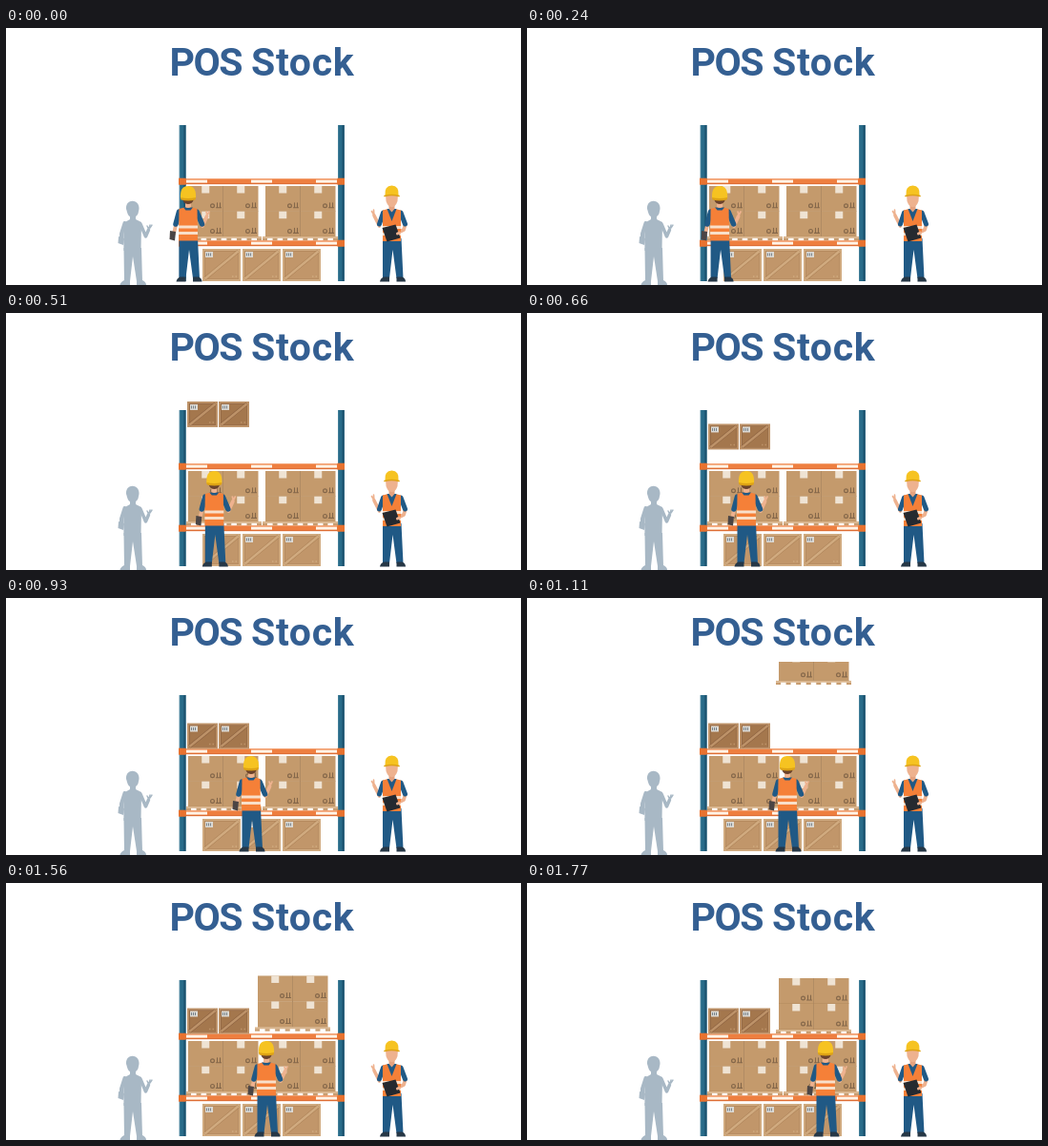
Recreate the animation shown at these times as an HTML page. Size 540 by 270 pixels, loop 1.8 s.

```html
<!DOCTYPE html>
<html lang="en">
<head>
<meta charset="utf-8">
<title>POS Stock</title>
<style>
html, body { margin: 0; width: 100%; height: 100%; overflow: hidden; background: #fff; }
svg { display: block; width: 540px; height: 270px; }
.title { font: 700 41px Roboto, Inter, sans-serif; fill: #345f92; }
</style>
</head>
<body>
<svg viewBox="0 0 540 270">
  <defs>
    <clipPath id="below"><rect x="0" y="67" width="540" height="203"/></clipPath>
  </defs>
  <text class="title" y="49.5"><tspan x="171.500" letter-spacing="-1.500">POS</tspan> <tspan x="257" letter-spacing=".7">Stock</tspan></text>
  <g id="rack"></g>
  <g clip-path="url(#below)">
    <g id="crates"></g>
    <g id="load"></g>
  </g>
  <g id="shade" fill="#a8b8c5" stroke="#a8b8c5" stroke-linecap="round" stroke-linejoin="round">
    <path d="M126 190C125 179 140 179 139.500 190L138.500 195Q136.500 199 133 199Q129 199 127.500 195Z" stroke="none"/>
    <path d="M130 196H136V201L142 204L141.500 234H123.500L123 205L130 201Z" stroke="none"/>
    <path d="M124.500 205L121 216L121 224" fill="none" stroke-width="4"/>
    <path d="M141 206L146.500 219L149.500 212" fill="none" stroke-width="3.500"/>
    <path d="M149.500 212L151 207M149.500 211L148 208M151 210L153 207" fill="none" stroke-width="1.400"/>
    <path d="M118 219L124 221L123 228L117.500 226Z" stroke="none"/>
    <path d="M123.500 231H142L143 266H137L133 240L130 266H124Z" stroke="none"/>
    <path d="M119.500 270Q120 267 124 265H130V270ZM137 270V265H143Q147 267 147 270Z" stroke="none"/>
  </g>
  <g id="clerk"></g>
  <g id="worker"></g>
</svg>
<script>
const LOOP = 1800, STEP = 30;
const el = id => document.getElementById(id);
const rect = (x, y, w, h, fill) =>
  `<rect x="${x}" y="${y}" width="${w}" height="${h}" fill="${fill}"/>`;
const shape = (d, fill) => `<path d="${d}" fill="${fill}"/>`;
const line = (d, color, width, cap = 'round') =>
  `<path d="${d}" fill="none" stroke="${color}" stroke-width="${width}" stroke-linecap="${cap}" stroke-linejoin="round"/>`;

const navy = '#205985', dark = '#263746', skin = '#eeb28f', orange = '#f58038',
      stripe = '#f9dfc9', yellow = '#f6c321', amber = '#dea315';

function carton(x, y, w, h) {
  const mx = x + w - 12, my = y + h - 7, ink = '#84674a';
  return rect(x, y, w, h, '#c49a6c') +
    rect(x, y + h - 0.6, w, 0.6, '#b58c5f') +
    rect(x + w / 2 - 4, y, 8, 7.5, '#efe3d3') +
    `<circle cx="${mx + 1}" cy="${my + 1}" r="1.900" fill="none" stroke="${ink}" stroke-width="1.200"/>` +
    line(`M${mx + 6} ${my + 3}v-5M${mx + 9} ${my + 3}v-5M${mx + 5} ${my + 3}h5`, ink, 1.1);
}

function stack(x, y, rowH) {
  let s = '';
  for (const r of [0, 1]) for (const c of [0, 1])
    s += carton(x + c * 37, y + r * rowH, 36.5, rowH);
  return s + rect(x + 36.2, y, 0.8, rowH * 2, '#a67c50');
}

function pallet(x, y, w) {
  let s = rect(x, y, w, 1.8, '#d9b48b');
  for (let i = 0; i < 8; i++) s += rect(x + i * (w - 5) / 7, y + 1.8, 5, 2.4, '#c89d70');
  return s;
}

function crate(x, y, w, h, wood, shadow, light) {
  const slat = `M${x + 2.5} ${y + h - 2.5}L${x + w - 2.5} ${y + 2.5}`;
  return rect(x, y, w, h, light) +
    rect(x + 2, y + 2, w - 4, h - 4, shadow) +
    rect(x + 2.6, y + 2.6, w - 5, h - 5, wood) +
    line(slat, shadow, 3.6, 'butt') + line(slat, light, 2.6, 'butt') +
    rect(x + 3, y + 3, 8, 6, '#dcdad5') +
    line(`M${x + 4.5} ${y + 4.5}v3m2 -3v3m2 -3v3`, '#78838b', 1, 'butt') +
    line(`M${x + w - 9} ${y + h - 5}h1.5m2 0h1.5`, light, 1.5, 'butt');
}

function beam(y) {
  return rect(182, y, 172, 5.8, '#ee7f40') + rect(182, y + 4.8, 172, 1, '#dc6c33') +
    rect(181, y - 0.6, 7.5, 7, '#e8722f') + rect(347.5, y - 0.6, 7.5, 7, '#e8722f') +
    [[189, 22], [257, 22], [325, 22]].map(([x, w]) => rect(x, y + 1.3, w, 3, '#fff4e8')).join('');
}

const post = x => rect(x, 102, 6.7, 164, '#286b89') + rect(x + 4.5, 102, 2.2, 164, '#1b526f') +
  rect(x, 102, 1, 164, '#427f99');

el('rack').innerHTML =
  [206, 248, 290].map(x => crate(x, 232, 40, 34, '#c1966a', '#ad8257', '#d0aa7f')).join('') +
  stack(191, 166, 26.7) + stack(272, 166, 26.7) +
  pallet(189, 219, 79) + pallet(269, 219, 79) +
  post(181.8) + post(348) + beam(158.3) + beam(223.3);

el('crates').innerHTML =
  [190, 223].map(x => crate(x, 131.5, 32, 27, '#a4774d', '#8b6140', '#bd9268')).join('');

el('load').innerHTML = stack(264, 100, 27) + pallet(261, 154, 79);

const legs = shape('M-9.500 221H10L12 263H5L1 233L-2.500 263H-9.500Z', navy);
const shoes = shape('M-12.500 266.500Q-12 263 -8.500 261.500H-2.500V266.500ZM5 266.500V261.500H11Q14.500 263 14.500 266.500Z', dark);

// Seen from behind, x = 0 at the head
el('worker').innerHTML =
  legs + shoes +
  line('M-13 207L-15 216', skin, 3.8) +
  line('M15 208L19.500 198', skin, 3.8) + line('M20 197L19 193M20 197L22 193', skin, 1.7) +
  line('M-9.500 193L-13 206', navy, 5.5) +
  line('M9 193L14.500 206', navy, 5.5) +
  shape('M-19 213L-13 214L-14 223.500L-19.500 222Z', '#4b4545') +
  shape('M-9.500 190Q0 186.500 9.500 190L10 223.500H-10Z', orange) +
  shape('M-5 188.500H5L2.500 191.500H-2.500Z', navy) +
  rect(-10, 207.5, 20, 3, stripe) + rect(-10, 214, 20, 3, stripe) +
  shape('M-3 181H3V188Q0 190 -3 188Z', skin) +
  shape('M-6.500 176H6.500L5.500 181Q4 185 0 185Q-4 185 -5.500 181Z', '#6b422b') +
  shape('M-8 179Q-9 166 0 166Q9 166 8 179Q0 182 -8 179Z', yellow) +
  shape('M-8 178Q0 180 8 178L7.500 180.500Q0 182.500 -7.500 180.500Z', amber);

// Seen from the front
el('clerk').innerHTML = `<g transform="translate(404.500 0)">` +
  legs + shoes +
  line('M-13 208L-18.500 197', skin, 3.6) + line('M-18.500 197L-21 192.500M-18.500 197L-19 191', skin, 1.6) +
  line('M-9 194L-13 206', navy, 5) +
  line('M14 207L12.500 212L6 215', skin, 3.8) +
  line('M9.500 194L14 206', navy, 5) +
  shape('M-9.500 191.500Q0 188 9.500 191.500L9.500 224H-9.500Z', orange) +
  shape('M-5 190H5L0 203Z', navy) +
  rect(-9.5, 208, 19, 3, stripe) + rect(-9.5, 215, 19, 3, stripe) +
  shape('M-3 184H3V190L0 193.500L-3 190Z', '#e5a27e') +
  shape('M-6.500 175H6.500L6 182Q4 188 0 188Q-4 188 -6 182Z', skin) +
  shape('M-7 176Q-8 165.500 0 165.500Q8 165.500 7 176Z', yellow) +
  line('M-7.500 176.500Q0 174.500 7.500 176.500', amber, 1.6) +
  shape('M-10 210L4 206.500L9 220.500L-5 224.500Z', '#252a30') +
  line('M6 216L8 215', skin, 3) + `</g>`;

// [time, x] of the worker
const walk = [[0, 191], [390, 209], [660, 230], [930, 257], [1110, 273], [1620, 273], [1770, 313], [1800, 313]];

function along(path, t) {
  const i = Math.max(1, path.findIndex(p => p[0] > t));
  const [a, x] = path[i - 1], [b, y] = path[i];
  return x + (y - x) * (t - a) / (b - a);
}

// Height above the shelf while settling down at time end
const lift = (t, end, k) => k * Math.max(0, end - t) ** 1.5;
const move = (id, x, y) => el(id).setAttribute('transform', `translate(${x} ${y})`);

function draw(t) {
  move('worker', along(walk, t), 0);
  move('crates', 0, -lift(t, 832, 0.00667));
  move('load', 0, -lift(t, 1617, 0.00588));
}

const start = performance.now();
function tick() {
  const t = (performance.now() - start) % LOOP;
  draw(Math.floor(t / STEP) * STEP);
  requestAnimationFrame(tick);
}
draw(0);
requestAnimationFrame(tick);
</script>
</body>
</html>
```
